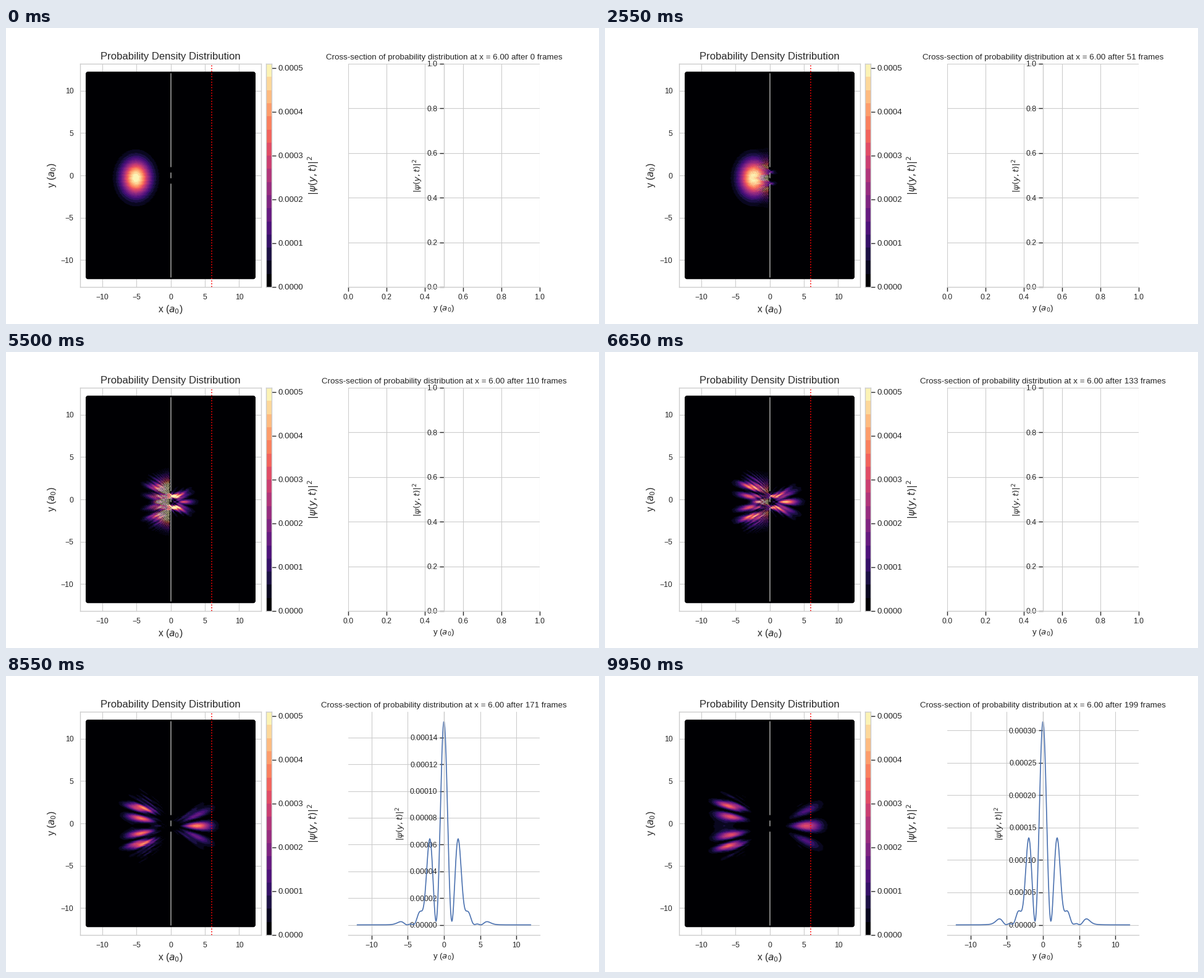
A matplotlib script that plays this animation: 960 px wide and 480 px high, repeating every 10000 ms.

```python
import numpy as np
import matplotlib.pyplot as plt
from matplotlib.animation import FuncAnimation

W, H, DPI = 960, 480, 80
FRAMES, INTERVAL = 200, 50
SECTION_START = 140
DARK, LIGHT = "#262626", "#cccccc"

plt.rcParams.update({
    "font.family": "Liberation Sans", "font.size": 12,
    "text.color": DARK, "axes.labelcolor": DARK,
    "axes.labelsize": 12, "axes.titlesize": 12,
    "axes.edgecolor": LIGHT, "axes.linewidth": 1.25,
    "axes.grid": True, "axes.axisbelow": True,
    "grid.color": LIGHT, "grid.linewidth": 1,
    "xtick.color": DARK, "ytick.color": DARK,
    "xtick.labelsize": 11, "ytick.labelsize": 11,
    "xtick.major.size": 6, "ytick.major.size": 6,
    "xtick.major.width": 1.25, "ytick.major.width": 1.25,
    "lines.linewidth": 1.5, "lines.solid_capstyle": "round",
})

# ---- wave packet meeting a double slit ----
# The short wave is only a few grid steps long, so the lattice shapes its speed.
DX, DT, SUBSTEPS = 0.08, 0.0043, 2
K0, X0 = 20, -4.9
NX, NY = 301, 150                 # only y > 0 is solved, the state is even in y
MID, SECTION = 150, 225           # grid columns at x = 0 and x = 6
SLIT = slice(4, 13)
VMAX = DX**2 / (4 * np.pi)
SECTION_PEAK = 3.13e-4

xs = -12 + DX * np.arange(NX)
ys = DX * (np.arange(NY) + 0.5)


def propagator(n, even=False):
    """exp(-i T dt) on n points with closed ends, or mirrored at the first."""
    t = 2 * np.eye(n) - np.eye(n, k=1) - np.eye(n, k=-1)
    if even:
        t[0, 0] = 1
    e, v = np.linalg.eigh(t / (2 * DX**2))
    u = (v * np.exp(-1j * e * DT / SUBSTEPS)) @ v.T
    return u.astype(np.complex64)


def simulate():
    free_x, free_y = propagator(NX), propagator(NY, even=True)
    slit_y = propagator(SLIT.stop - SLIT.start)
    wall_x = np.zeros((NX, NX), np.complex64)
    wall_x[:MID, :MID] = wall_x[MID + 1:, MID + 1:] = propagator(MID)

    r2 = (xs[:, None] - X0)**2 + ys**2
    psi = np.sqrt(VMAX) * np.exp(-r2 / 8 + 1j * K0 * xs[:, None])
    psi = psi.astype(np.complex64)
    out = np.empty((FRAMES, NX, NY), np.float32)
    for n in range(FRAMES):
        out[n] = psi.real**2 + psi.imag**2
        for _ in range(SUBSTEPS):
            q = wall_x @ psi
            q[:, SLIT] = free_x @ psi[:, SLIT]
            psi = q @ free_y
            psi[MID] = 0
            psi[MID, SLIT] = q[MID, SLIT] @ slit_y
    return out


def mirror(half):
    return np.concatenate([half[..., ::-1], half], axis=-1)


density = simulate()
section = mirror(density[:, SECTION])
section *= SECTION_PEAK / section[-1].max()

# ---- banded colours ----
BANDS = 17
cmap = plt.get_cmap("magma")
palette = np.zeros((BANDS + 1, 4), np.float32)
palette[:BANDS] = cmap(np.linspace(0, 0.98, BANDS))
palette[BANDS] = 1, 1, 1, 0       # uncovered ground

# ---- overlapping round markers: each pixel shows the last one drawn on it ----
CX, CY = 266.5, 241.0             # pixel place of the data origin, y upwards
SX, SY = 293 / 26.4, 362 / 26.4   # pixels per data unit
RADIUS = 4.1 * DPI / 72
LEFT, RIGHT, BOTTOM, TOP = 128, 405, 70, 412
SUB = 2


def marker_map():
    q = (LEFT + (np.arange(SUB * (RIGHT - LEFT)) + 0.5) / SUB)[None, :]
    p = (BOTTOM + (np.arange(SUB * (TOP - BOTTOM)) + 0.5) / SUB)[:, None]
    dx, dy = DX * SX, DX * SY
    gx, gy = CX + SX * xs[0], CY - SY * ys[-1]
    last = 2 * NY - 1
    top = np.minimum(np.floor((p + RADIUS - gy) / dy), last).astype(int)
    col = np.zeros((p.size, q.size), int)
    row = np.zeros_like(col)
    found = np.zeros(col.shape, bool)
    for k in range(10):
        j = top - k
        chord2 = RADIUS**2 - (gy + j * dy - p)**2
        w = np.sqrt(np.maximum(chord2, 0))
        i = np.minimum(np.floor((q + w - gx) / dx), NX - 1).astype(int)
        hit = (~found & (j >= 0) & (chord2 >= 0) & (i >= 0)
               & (gx + i * dx >= q - w))
        col[hit] = i[hit]
        row[hit] = np.broadcast_to(j, hit.shape)[hit]
        found |= hit
    return np.where(found, col * 2 * NY + row, NX * 2 * NY)


markers = marker_map()


def field_image(n):
    band = np.minimum(mirror(density[n]) / VMAX * BANDS, BANDS - 1)
    band = np.append(band.astype(np.uint8).ravel(), np.uint8(BANDS))
    rgba = palette[band[markers]]
    rgba = sum(rgba[a::SUB, b::SUB] for a in range(SUB) for b in range(SUB))
    return (rgba * (255 / SUB**2)).astype(np.uint8)


# ---- figure ----
fig = plt.figure(figsize=(W / DPI, H / DPI), dpi=DPI, facecolor="white")


def add_axes(x0, x1):
    return fig.add_axes([x0 / W, 60 / H, (x1 - x0) / W, 362 / H])


field = add_axes(120, 413)
picture = field.imshow(
    field_image(0), origin="lower", aspect="auto", interpolation="nearest",
    zorder=1, extent=((LEFT - CX) / SX, (RIGHT - CX) / SX,
                      (BOTTOM - CY) / SY, (TOP - CY) / SY))
for lo, hi in ((1.0, 12), (-0.28, 0.28), (-12, -1.0)):
    field.plot([0, 0], [lo, hi], color="#999999", zorder=2)
field.axvline(6, color="red", ls=":", zorder=2)
field.set(xlim=(-13.2, 13.2), ylim=(-13.2, 13.2),
          xticks=range(-10, 11, 5), yticks=range(-10, 11, 5))
field.tick_params(bottom=False, left=False)
field.set_title("Probability Density Distribution", fontsize=15)
field.set_xlabel("x ($a_0$)", fontsize=14)
field.set_ylabel("y ($a_0$)", fontsize=14)

bar = add_axes(421, 430.3)
bar.imshow(palette[:BANDS, None, :3], origin="lower", aspect="auto",
           interpolation="nearest", extent=(0, 1, 0, VMAX))
bar.grid(False)
bar.set_xticks([])
bar.yaxis.tick_right()
bar.yaxis.set_label_position("right")
bar.set_yticks(np.arange(6) * 1e-4)
bar.yaxis.set_major_formatter("{x:.4f}")
bar.tick_params(labelsize=12)
bar.set_ylabel(r"$|\psi(y,t)|^2$", fontsize=14)

cross = add_axes(554, 864)
cross.spines["left"].set_position("center")
cross.spines[["top", "right"]].set_visible(False)
cross.set_xlabel("y ($a_0$)")
cross.set_ylabel(r"$|\psi(y,t)|^2$")
curve, = cross.plot([], [], color="#4C72B0")
title = cross.set_title("")
y_all = np.concatenate([-ys[::-1], ys])


def draw(n):
    picture.set_data(field_image(n))
    title.set_text("Cross-section of probability distribution "
                   f"at x = 6.00 after {n} frames")
    if n < SECTION_START:
        curve.set_data([], [])
        cross.set(xlim=(0, 1), ylim=(0, 1))
    else:
        curve.set_data(y_all, section[n])
        peak = float(section[n].max())
        cross.set(xlim=(-13.2, 13.2), ylim=(-0.05 * peak, 1.05 * peak))
    return picture, curve, title


anim = FuncAnimation(fig, draw, frames=FRAMES, interval=INTERVAL,
                     init_func=lambda: draw(0), repeat=True, repeat_delay=0)
plt.show()
```
